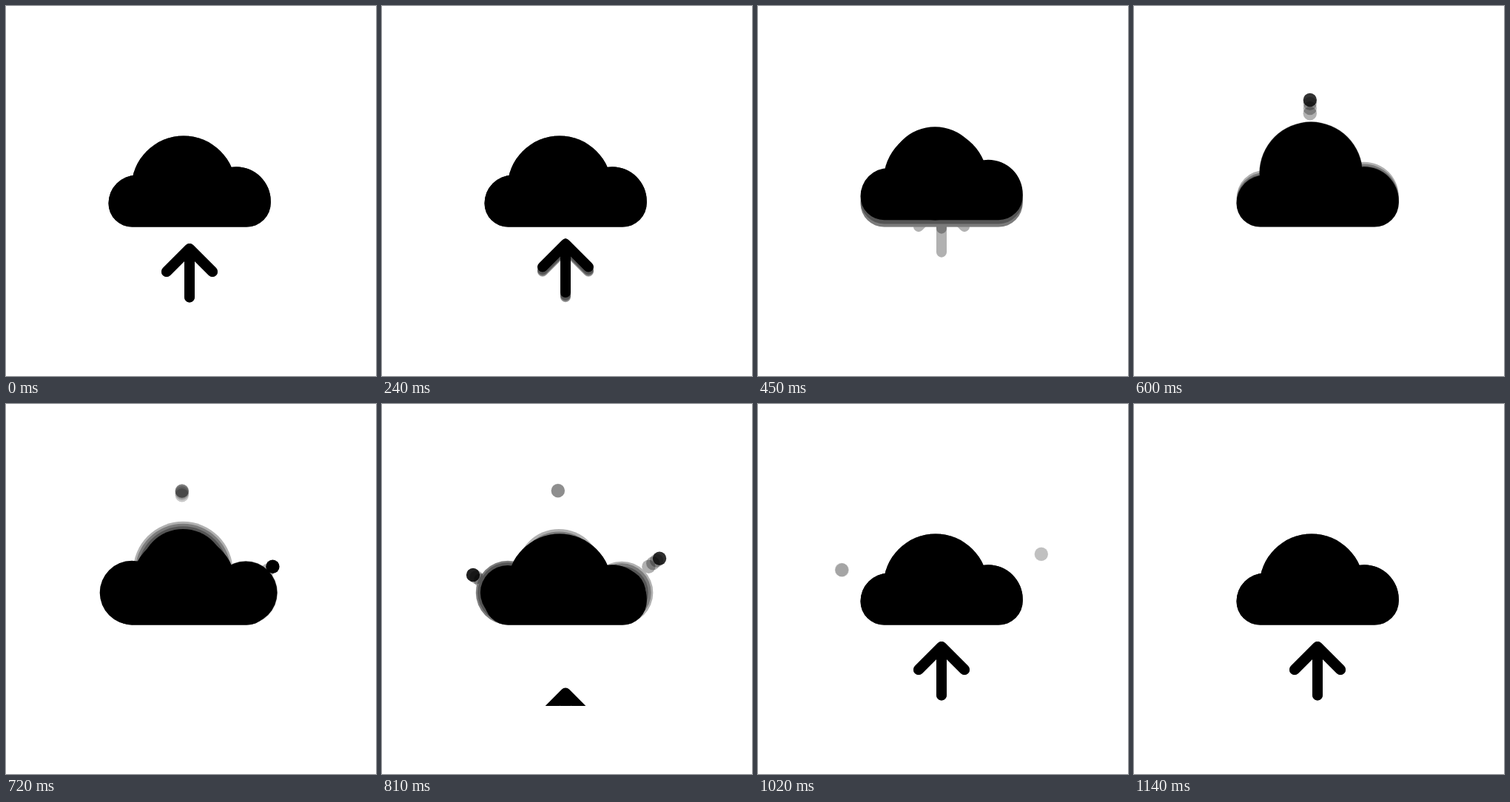
Write an HTML page with a canvas that moves like this. It is 500 px wide and 500 px high and loops after 1170 ms.

```html
<!DOCTYPE html>
<html lang="en">
<head>
<meta charset="utf-8">
<title>Cloud upload</title>
<style>
  html, body { margin: 0; width: 100%; height: 100%; overflow: hidden; background: #fff; }
  canvas { display: block; width: 500px; height: 500px; }
</style>
</head>
<body>
<canvas id="stage" width="500" height="500"></canvas>
<script>
const SIZE = 500, LOOP = 1170, STEP = 30;
const ECHOES = 3, ECHO_ALPHA = 0.3;
const PI = Math.PI;

const ctx = document.getElementById('stage').getContext('2d');
const layer = document.createElement('canvas');
layer.width = layer.height = SIZE;
const g = layer.getContext('2d');

const clamp01 = x => Math.min(1, Math.max(0, x));
const progress = (t, a, b) => clamp01((t - a) / (b - a));
const smooth = x => x * x * (3 - 2 * x);

// Lobes swell quickly and settle slowly.
const lobes = [
  { x: 239.2, y: 226.3, start: 410, peak: 575, end: 830, lo: 49, hi: 70 },
  { x: 324, y: 255, start: 600, peak: 700, end: 850, lo: 30, hi: 43 },
  { x: 170, y: 255, start: 640, peak: 735, end: 920, lo: 26, hi: 43.3 }
];

// Each drop is thrown outwards along (dx, dy) and comes to rest at (x, y).
const drops = [
  { x: 237.8, y: 117, dx: 0, dy: 1, start: 465, rest: 774, fade: [530, 880] },
  { x: 383, y: 202.7, dx: -0.8, dy: 0.6, start: 675, rest: 984, fade: [760, 1030] },
  { x: 113, y: 224, dx: 0.82, dy: 0.57, start: 690, rest: 999, fade: [775, 1050] }
];

function disc(x, y, r) {
  g.beginPath();
  g.arc(x, y, r, 0, 2 * PI);
  g.fill();
}

function drawCloud(t) {
  const lift = t < 455
    ? smooth(progress(t, 390, 455))
    : 1 - smooth(progress(t, 455, 600));
  g.save();
  g.translate(0, -9.7 * lift);
  g.beginPath();
  g.arc(170.5, 266.7, 32, PI / 2, PI);
  g.arc(176.5, 266.5, 38, PI, 1.5 * PI);
  g.arc(311, 264, 46.8, -PI / 2, 0);
  g.arc(325, 265.9, 32.8, 0, PI / 2);
  g.fill();
  g.beginPath();
  g.arc(240, 246, 70.5, PI, 2 * PI);
  g.fill();
  g.restore();

  for (const { x, y, start, peak, end, lo, hi } of lobes) {
    if (t <= start || t >= end) continue;
    const swell = t < peak
      ? 1 - (1 - progress(t, start, peak)) ** 4
      : 1 - smooth(progress(t, peak, end));
    const r = lo + (hi - lo) * swell;
    disc(x, y, r);
  }
}

function arrowOffset(t) {
  if (t < 600) return -Math.min(130, Math.max(0, (t - 55) / 122.4) ** 4.5);
  return 15 * Math.max(0, (900 - t) / STEP) ** 1.3;
}

function drawArrow(t) {
  g.save();
  g.beginPath();
  g.rect(0, 0, SIZE, 408);
  g.clip();
  g.translate(248, 328 + arrowOffset(t));
  g.beginPath();
  g.moveTo(-31, 31);
  g.lineTo(0, 0);
  g.lineTo(31, 31);
  g.moveTo(0, 0);
  g.lineTo(0, 65.5);
  g.lineWidth = 14;
  g.lineCap = g.lineJoin = 'round';
  g.stroke();
  g.restore();
}

function drawDrops(t) {
  for (const { x, y, dx, dy, start, rest, fade } of drops) {
    if (t < start || t >= fade[1]) continue;
    const d = 28.3 * Math.max(0, (rest - t) / 264) ** 2.5;
    g.globalAlpha = 1 - progress(t, fade[0], fade[1]);
    disc(x + dx * d, y + dy * d, 9.2);
  }
  g.globalAlpha = 1;
}

function drawScene(t) {
  g.clearRect(0, 0, SIZE, SIZE);
  drawArrow(t);
  // Everything of the cloud stays above its flat base.
  g.save();
  g.beginPath();
  g.rect(0, 0, SIZE, 298.7);
  g.clip();
  drawCloud(t);
  g.restore();
  drawDrops(t);
}

function render(t) {
  ctx.globalAlpha = 1;
  ctx.fillStyle = '#fff';
  ctx.fillRect(0, 0, SIZE, SIZE);
  for (let i = ECHOES; i >= 0; i--) {
    drawScene((t - i * STEP + LOOP) % LOOP);
    ctx.globalAlpha = i ? ECHO_ALPHA : 1;
    ctx.drawImage(layer, 0, 0);
  }
}

// The centre lobe is only a dome: its lower part lies inside the body.
lobes[0].dome = true;

const origin = performance.now();
function tick() {
  const t = (performance.now() - origin) % LOOP;
  render(Math.floor(t / STEP) * STEP);
  requestAnimationFrame(tick);
}
tick();
</script>
</body>
</html>
```
